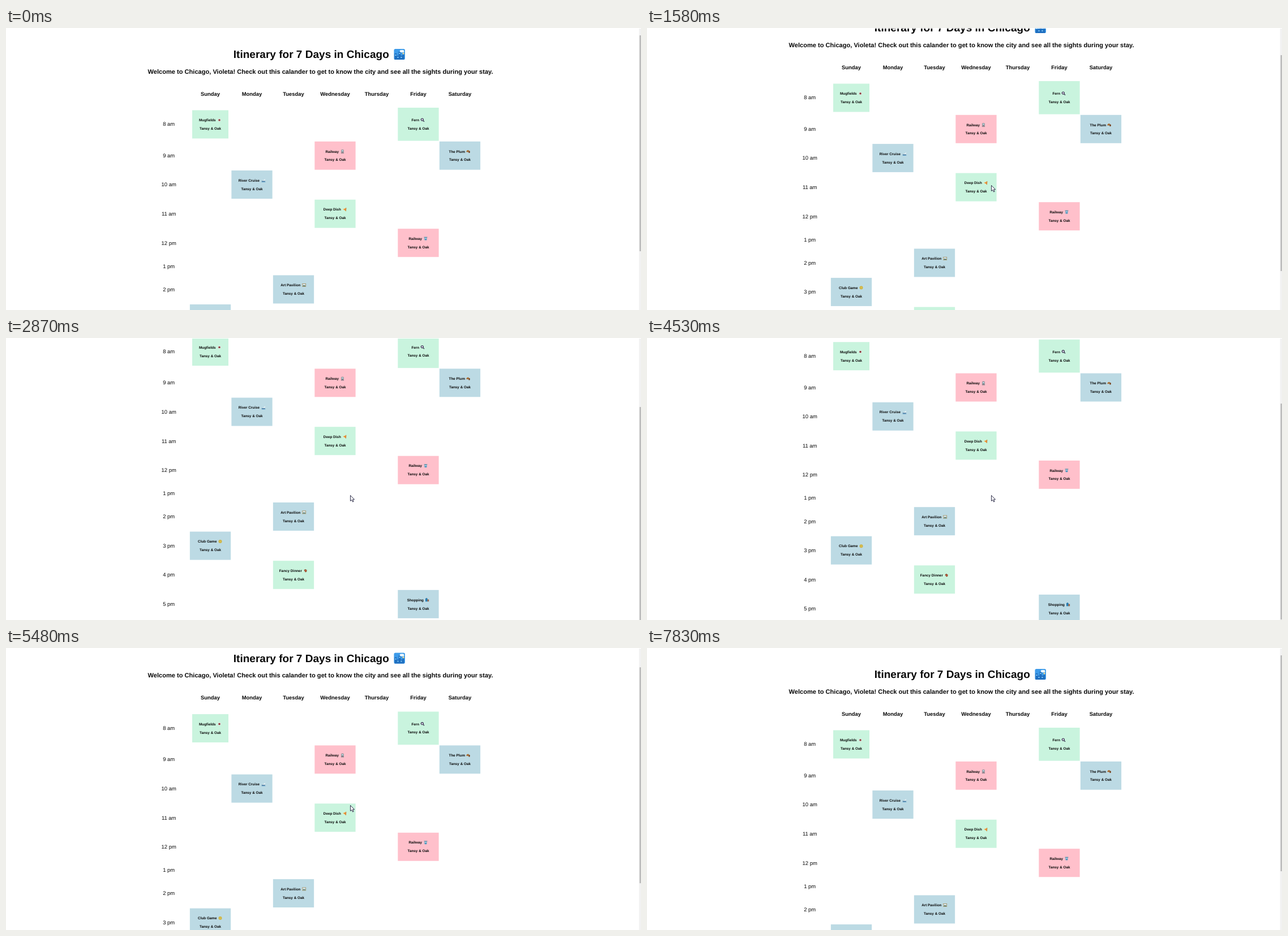
Animation, 1122 px wide and 499 px high, one loop 8.63 s. Source, as an HTML page:

```html
<!DOCTYPE html>
<html lang="en">
<head>
<meta charset="utf-8">
<title>Itinerary</title>
<style>
  @property --scroll { syntax: "<number>"; inherits: true; initial-value: 0; }

  html, body { margin: 0; width: 100%; height: 100%; overflow: hidden; background: #fff; }
  svg { display: block; width: 100%; height: 100%; animation: scroll 8630ms infinite; }
  text {
    font-family: "Liberation Sans", Arial, sans-serif;
    font-size: 9.46px;
    text-anchor: middle;
    text-rendering: geometricPrecision;
    fill: #0a0a0a;
  }
  .bold, .title, .intro, .event { font-weight: bold; }
  .title { font-size: 19.05px; text-anchor: start; }
  .intro { font-size: 11.08px; }
  .event { font-size: 6.34px; }

  #page { transform: translateY(calc(var(--scroll) * -1px)); }
  #thumb { transform: translateY(calc(var(--scroll) * .745px)); }
  #cursor { animation: cursor 8630ms step-end infinite; }

  @keyframes scroll {
    0%     { --scroll: 0; animation-timing-function: step-end; }
    14.39% { --scroll: 0; animation-timing-function: steps(5); }
    18.3%  { --scroll: 47; animation-timing-function: steps(8); }
    24.56% { --scroll: 97.3; animation-timing-function: steps(6); }
    29.3%  { --scroll: 133; animation-timing-function: steps(5); }
    33.25% { --scroll: 146.5; animation-timing-function: step-end; }
    51.7%  { --scroll: 146.5; animation-timing-function: steps(9); }
    58.86% { --scroll: 73; animation-timing-function: steps(7); }
    64.18% { --scroll: 21; animation-timing-function: steps(6); }
    68.82%, 100% { --scroll: 0; }
  }

  @keyframes cursor {
    0%     { transform: translate(1070px, 512px); }
    6.48%  { transform: translate(963px, 451px); }
    7.29%  { transform: translate(715px, 335px); }
    8.1%   { transform: translate(608px, 278px); }
    76.58% { transform: translate(655px, 303px); }
    77.39% { transform: translate(745px, 352px); }
    78.2%  { transform: translate(825px, 394px); }
    79.02% { transform: translate(853px, 409px); }
    82.14% { transform: translate(965px, 458px); }
    82.84% { transform: translate(1026px, 486px); }
    86.66% { transform: translate(1032px, 488px); }
    87.47% { transform: translate(1042px, 490px); }
    88.28% { transform: translate(1052px, 493px); }
    89.09% { transform: translate(1060px, 495px); }
    89.9%  { transform: translate(1067px, 497px); }
    90.72%, 100% { transform: translate(1070px, 512px); }
  }
</style>
</head>
<body>
<svg viewBox="0 0 1122 499" preserveAspectRatio="none">
  <g id="page">
    <text class="title" x="401.8" y="53.2">Itinerary for 7 Days in Chicago</text>
    <g transform="translate(685.5 37)">
      <rect width="19.5" height="19" rx="2.5" fill="#3d9be9"/>
      <path d="M1 19V8h4v4h3V5h4v7h3v-2h3v9z" fill="#1f6fc0"/>
      <path d="M2 10h2v2H2zM9 7h2v2H9zM6 14h2v2H6zM12 14h2v2h-2z" fill="#8ad0fa"/>
      <path d="M10 4q1-3 4-2 4-1 4 3-1 2-3 1-4 1-5-2z" fill="#eef8ff"/>
      <circle cx="16.5" cy="8" r="1.5" fill="#f2d98a"/>
    </g>
    <text class="intro" x="555.5" y="80.9">Welcome to Chicago, Violeta! Check out this calander to get to know the city and see all the sights during your stay.</text>
  </g>
  <rect width="1122" height="1" fill="#fff"/>
  <rect x="1118.5" y="1" width="3.5" height="498" fill="#f1f1f1"/>
  <rect id="thumb" x="1119.4" y="13" width="2.6" height="382" fill="#bcbcbc"/>
  <path id="cursor" d="M.5.5V10.5L2.9 8.4 4.5 12 6.2 11.3 4.6 7.8H7.6Z" fill="#fff" stroke="#1d1d3c" stroke-width=".9"/>
</svg>
<script>
  const days = ["Sunday", "Monday", "Tuesday", "Wednesday", "Thursday", "Friday", "Saturday"];
  const hours = [
    ["8 am", 170], ["9 am", 225.6], ["10 am", 277], ["11 am", 328.7], ["12 pm", 380.3],
    ["1 pm", 421.5], ["2 pm", 462.6], ["3 pm", 514], ["4 pm", 565.6], ["5 pm", 617.2]
  ];
  const green = "#c9f4de", pink = "#ffc0cb", blue = "#bcdae4";

  // Small icons, each centred on its own origin
  const icons = {
    cup: `<path d="M-2.5-2.5h5v3q-1 2.5-2.5 2.5t-2.5-2.5z" fill="#dfe3df"/><circle r="1.7" fill="#8b3838"/>`,
    pan: `<circle cx="-.6" cy="-.6" r="2.1" fill="#d9d5ea" stroke="#39364e" stroke-width="1.2"/>
      <path d="M1 1 3 3" stroke="#39364e" stroke-width="1.4"/>`,
    train: `<rect x="-2.2" y="-3" width="4.4" height="5.4" rx="1" fill="#7f8b92"/>
      <path d="M-1.4-1.8h2.8v1.8h-2.8z" fill="#c9e4ec"/><path d="M-2.6 3h5.2" stroke="#59636b"/>`,
    tram: `<path d="M-3-3h6v1.4h-6z" fill="#7d98a6"/><rect x="-2" y="-2" width="4" height="5" rx=".7" fill="#4b96bd"/>
      <path d="M-1.3-1h2.6V.4h-2.6z" fill="#c8e3ee"/>`,
    seeds: `<ellipse cx="-1" cy="-1" rx="2.4" ry="1.5" transform="rotate(-30)" fill="#a96a2d"/>
      <ellipse cx="1.5" cy="1" rx="1.4" ry="2" fill="#7a4520"/>`,
    ship: `<path d="M-3.5 1h6.8L2 3h-4.8z" fill="#5d85a7"/><path d="M-2 .6 1-.8 2.7-2.8V.6z" fill="#eef3f6"/>
      <path d="M-3.5 3h7" stroke="#4d9ac9" stroke-width=".7"/>`,
    slice: `<path d="M-3.2-.3 2.5-2.8 2 3z" fill="#f3aa42"/><path d="M2.3-2.8 1.9 3" stroke="#c97830" stroke-width="1.1"/>
      <circle cx=".2" r=".8" fill="#dc6335"/>`,
    picture: `<rect x="-3" y="-2.5" width="6" height="5" fill="#dceaf0" stroke="#a18b5a" stroke-width=".8"/>
      <path d="M-2.5 2.1-.8-.4.6 1 1.5-.2 2.5 2.1z" fill="#4f7668"/>`,
    ball: `<circle r="3" fill="#cdb243"/><path d="M-2 0h4M0-2v4" stroke="#e2cb62" stroke-width=".6"/>`,
    meat: `<path d="M-2.7-.8-.5-2.7 2.5-1 2 2.2-.4 2.8z" fill="#8c4a2c"/><circle cx=".3" cy=".2" r="1.2" fill="#d26444"/>`,
    bags: `<path d="M-3-2.5h3.8V3H-3z" fill="#287eb4"/><path d="M.6-.8h2.6V3H.6z" fill="#9c6547"/>
      <path d="M-2-2.5q1-1.5 2 0" fill="none" stroke="#315a77" stroke-width=".6"/>`
  };

  // day, middle y, colour, name, icon, icon offset, width, height
  const events = [
    [0, 170.5, green, "Mugfields", "cup", 16, 64],
    [5, 170.3, green, "Fern", "pan", 7.5, 72.3, 58.6],
    [3, 225.8, pink, "Railway", "train", 13],
    [6, 225.8, blue, "The Plum", "seeds", 15],
    [1, 277.1, blue, "River Cruise", "ship", 20.5],
    [3, 328.7, green, "Deep Dish", "slice", 17],
    [5, 380.2, pink, "Railway", "tram", 13],
    [2, 462.5, blue, "Art Pavilion", "picture", 18.7],
    [0, 514.1, blue, "Club Game", "ball", 17.5],
    [2, 565.7, green, "Fancy Dinner", "meat", 21.2],
    [5, 617.4, blue, "Shopping", "bags", 15.5]
  ];

  const column = day => 361 + day * 73.5;
  const label = (x, y, text, type = "") => `<text class="${type}" x="${x}" y="${y}">${text}</text>`;

  function card([day, mid, color, name, icon, dx, w = 72.3, h = 50]) {
    const x = column(day);
    return `<rect x="${x - w / 2}" y="${mid - h / 2}" width="${w}" height="${h}" fill="${color}"/>`
      + label(x - 5.2, mid - 5.3, name, "event")
      + label(x, mid + 9.6, "Tansy &amp; Oak", "event")
      + `<g transform="translate(${x + dx} ${mid - 7.6})">${icons[icon]}</g>`;
  }

  document.getElementById("page").insertAdjacentHTML("beforeend", [
    ...days.map((day, i) => label(column(i), 119.8, day, "bold")),
    ...hours.map(([hour, y]) => label(287.7, y + 3.3, hour)),
    ...events.map(card)
  ].join(""));
</script>
</body>
</html>
```
